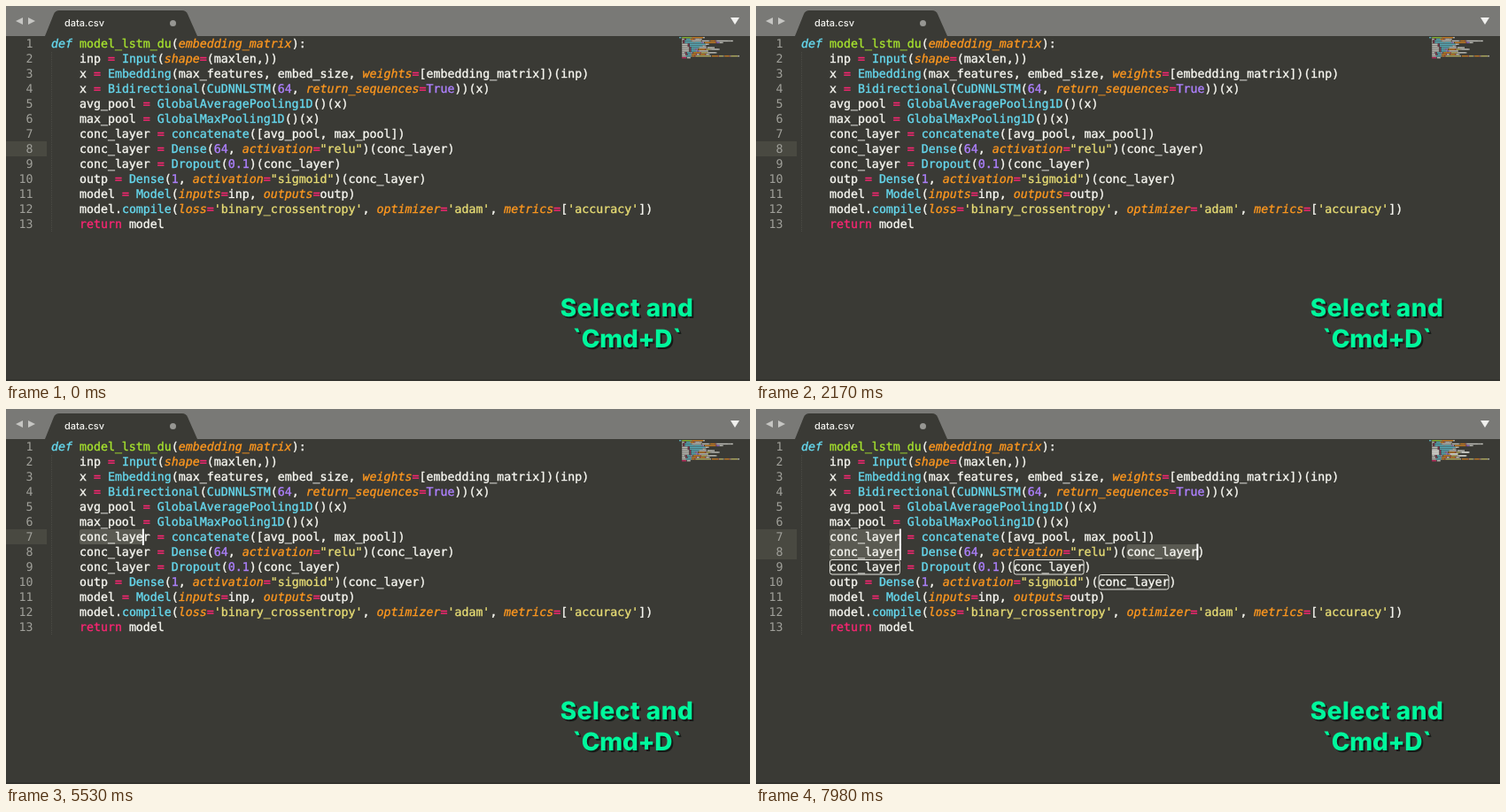
Write an HTML page that moves like this. It is 840 px wide and 424 px high and loops after 8000 ms.

```html
<!DOCTYPE html>
<html lang="en">
<head>
<meta charset="utf-8">
<title>Multiple selection</title>
<style>
html, body { margin: 0; width: 100%; height: 100%; overflow: hidden; background: #3a3a35; }
svg { display: block; width: 840px; height: 424px; }
text { white-space: pre; text-rendering: geometricPrecision; }
.code { font: 13.27px "DejaVu Sans Mono", "Liberation Mono", monospace; stroke-width: .35px; }
.italic { font-style: italic; }
.tab { font: 500 11px Inter, "Liberation Sans", sans-serif; }
.caption { font: 800 28px Inter, "Open Sans", sans-serif; text-anchor: middle; }
</style>
</head>
<body>
<svg viewBox="0 0 840 424">
  <rect width="840" height="424" fill="#3a3a35"/>
  <rect width="840" height="34" fill="#797976"/>
  <path d="M44 34 L54 9 Q56 5 60 5 H199 Q203 5 205 9 L216 34 Z" fill="#3a3a35"/>
  <path d="M19 13 V21 L11 17 Z M25 13 V21 L33 17 Z" fill="#c6c6c3"/>
  <path d="M818 13 H828 L823 21 Z" fill="#f0f0ee"/>
  <text class="tab" x="66" y="23" fill="#f4f4f0">data.csv</text>
  <circle cx="188.5" cy="19.5" r="3.5" fill="#969692"/>
  <path d="M51.5 52 V255" stroke="#4b4b45" stroke-dasharray="1 1"/>
  <rect y="422" width="840" height="2" fill="#32322e"/>
  <g id="under"></g>
  <g id="code"></g>
  <g id="map" opacity=".7"></g>
  <g id="over"></g>
  <g id="caption"></g>
</svg>
<script>
const LOOP = 8000, LEFT = 51, TOP = 34, CHAR = 7.99, ROW = 17;
const WHITE = "#f8f8f2", CYAN = "#66d9ef", GREEN = "#a6e22e", ORANGE = "#fd971f",
      PINK = "#f92672", PURPLE = "#ae81ff", YELLOW = "#e6db74";
const WORD = "conc_layer";
const lines = `def model_lstm_du(embedding_matrix):
    inp = Input(shape=(maxlen,))
    x = Embedding(max_features, embed_size, weights=[embedding_matrix])(inp)
    x = Bidirectional(CuDNNLSTM(64, return_sequences=True))(x)
    avg_pool = GlobalAveragePooling1D()(x)
    max_pool = GlobalMaxPooling1D()(x)
    conc_layer = concatenate([avg_pool, max_pool])
    conc_layer = Dense(64, activation="relu")(conc_layer)
    conc_layer = Dropout(0.1)(conc_layer)
    outp = Dense(1, activation="sigmoid")(conc_layer)
    model = Model(inputs=inp, outputs=outp)
    model.compile(loss='binary_crossentropy', optimizer='adam', metrics=['accuracy'])
    return model`.split("\n");

const $ = id => document.getElementById(id);
const colX = col => LEFT + col * CHAR;
const rowY = row => TOP + (row - 1) * ROW;

function add(parent, tag, attrs, text) {
  const el = document.createElementNS("http://www.w3.org/2000/svg", tag);
  for (const k in attrs) el.setAttribute(k, attrs[k]);
  if (text) el.textContent = text;
  return parent.appendChild(el);
}

function mapBar(parent, row, col, n, fill) {
  add(parent, "rect", { x: 760 + col * 0.8, y: 35 + (row - 1) * 1.9, width: n * 0.8, height: 1.4, fill });
}

function style(tok, next, row) {
  if (/^["']/.test(tok)) return [YELLOW];
  if (/^\d/.test(tok) || tok === "True") return [PURPLE];
  if (tok === "=" || tok === "return") return [PINK];
  if (tok === "def") return [CYAN, true];
  if (!/^\w/.test(tok)) return [WHITE];
  if (row === 1) return next === "(" ? [GREEN] : [ORANGE, true];
  if (next === "(") return [CYAN];
  if (next === "=") return [ORANGE, true];
  return [WHITE];
}

const matches = [];
lines.forEach((line, i) => {
  const row = i + 1, y = rowY(row) + 13;
  add($("code"), "text", { class: "code", x: 30.5, y, fill: "#a0a09a", "text-anchor": "end" }, String(row));
  for (const m of line.matchAll(/(["']).*?\1|\d[\d.]*|\w+|=|[^\w"'=\s]+/g)) {
    const tok = m[0], col = m.index, [fill, italic] = style(tok, line[col + tok.length], row);
    add($("code"), "text", { class: italic ? "code italic" : "code", x: colX(col), y, fill, stroke: fill }, tok);
    mapBar($("map"), row, col, tok.length, fill);
    if (tok === WORD) matches.push({ row, col });
  }
});

[["Select and", 351, 0.5], ["`Cmd+D`", 386, -0.3]].forEach(([text, y, gap]) => {
  for (const [d, fill] of [[2, "#151a17"], [0, "#00f79c"]])
    add($("caption"), "text", { class: "caption", x: 701 + d, y: y + d, fill, "letter-spacing": gap }, text);
});

const gutter = row => add($("under"), "rect", { y: rowY(row), width: 46, height: ROW, fill: "#494941" });
const caret = (row, col) => add($("over"), "rect", { x: colX(col) - 1, y: rowY(row) - 0.5, width: 2, height: 18.5, fill: "#fff" });

function select(row, col, n) {
  add($("under"), "rect", { x: colX(col), y: rowY(row), width: n * CHAR, height: ROW, rx: 2, fill: "#5a5a52" });
  caret(row, col + n);
}

function outline(row, col) {
  add($("over"), "rect", {
    x: colX(col) + 0.5, y: rowY(row) + 0.5, width: WORD.length * CHAR - 1, height: ROW - 0.5,
    rx: 2.5, fill: "none", stroke: "#e6e6df"
  });
}

const moves = [2590, 2940, 3220, 3430, 3570];  // caret reaches columns 0 to 4
const adds = [7210, 7630];                     // one more match is selected
const passed = (times, t) => times.filter(s => t >= s).length;

let last = "";
function draw(t) {
  const col = passed(moves, t) - 1, extra = passed(adds, t);
  const count = Math.max(0, Math.min(WORD.length, Math.floor((t - 3780) / 190)));
  const key = [col, count, extra].join();
  if (key === last) return;
  last = key;
  $("under").replaceChildren();
  $("over").replaceChildren();
  gutter(col < 0 ? 8 : 7);
  if (extra) gutter(8);
  if (count) select(7, 4, count);
  else if (col >= 0) caret(7, col);
  if (count < WORD.length) return;
  matches.forEach(({ row, col }, i) => {
    mapBar($("over"), row, col, WORD.length, "#d0d0ca");
    if (i > extra) outline(row, col);
    else if (i) select(row, col, WORD.length);
  });
}

function frame() {
  draw(performance.now() % LOOP);
  requestAnimationFrame(frame);
}
frame();
</script>
</body>
</html>
```
